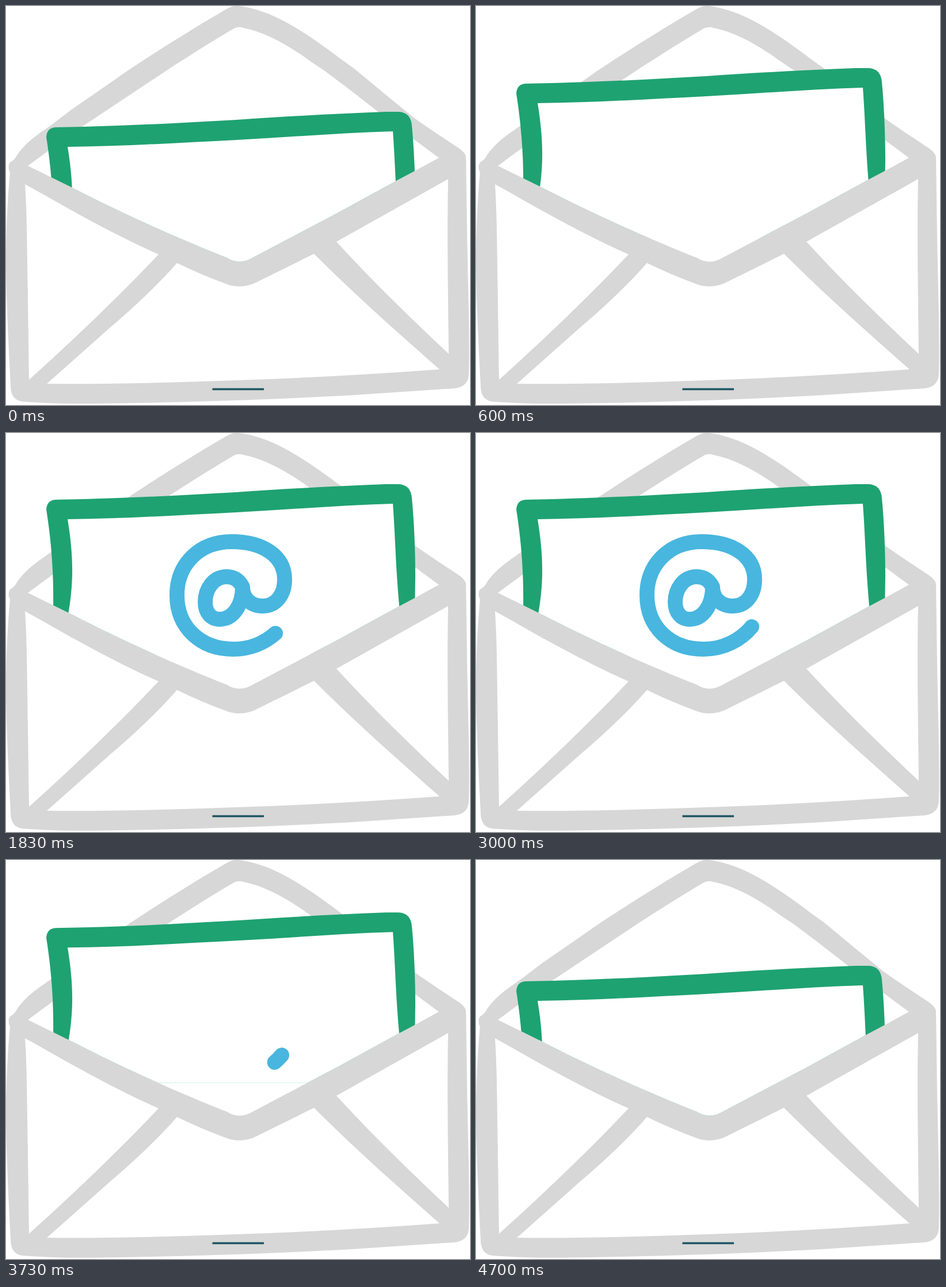
These frames come from a looping animation (806x694 px, 5010 ms). An HTML page:

```html
<!DOCTYPE html>
<html lang="en">
<head>
<meta charset="utf-8">
<title>Opening envelope</title>
<style>
  html, body { margin: 0; width: 100%; height: 100%; overflow: hidden; background: #fff; }
  svg { display: block; width: 806px; height: 694px; }
</style>
</head>
<body>
<svg viewBox="0 0 806 694">
  <clipPath id="opening">
    <path d="M0 0H806V264H752L710 287L678 304L574 361L430 437Q406 452 384 438C300 405 200 360 113 315L38 278H0Z"/>
  </clipPath>

  <!-- Envelope silhouette with its four openings cut out -->
  <path fill="#d7d7d7" fill-rule="evenodd" d="
    M404 0C396 -1 388 2 380 7C320 42 262 79 212 112L182 133L114 180L76 209C54 224 34 238 20 258
    Q15 268 7 272Q2 279 7 290C2 340 0 400 0 450C1 530 5 600 8 660Q8 685 28 688
    C90 693 150 692 200 691C330 689 470 684 600 677L780 665Q803 662 804 640
    C806 590 803 500 801 400L799 262Q797 253 780 243C756 227 730 210 708 194L658 153L605 109L580 91
    C530 53 480 20 440 8Q418 1 404 0Z
    M38 278L80 247L135 208L252 130L285 108C324 83 360 60 396 39Q404 35 412 38
    C448 45 488 66 527 95L551 111C584 135 616 160 645 183L710 233L752 264L710 287L678 304L574 361L430 437
    Q406 452 384 438C300 405 200 360 113 315Z
    M33 310L60 325C125 362 195 401 265 432C195 506 120 578 40 650C39 580 38 510 37 450Q36 350 33 310Z
    M297 447C262 487 220 526 180 560Q125 609 71 657C180 658 290 655 400 651Q580 645 753 632
    C676 564 606 502 535 431L430 483Q406 492 384 484Q340 468 297 447Z
    M574 410L768 301C766 400 768 510 769 605C704 544 638 480 574 410Z"/>

  <g clip-path="url(#opening)">
    <g id="letter">
      <path fill="#1ea271" d="M70 228Q71 212 86 211L135 210C220 208 310 203 400 198C490 192 575 187 660 184
        L682 184Q703 185 705 208C709 250 711 300 711 345L709 480H82V400C83 340 79 285 70 228Z"/>
      <path fill="#fff" d="M107 245C205 244 300 238 400 233C490 228 580 221 672 218C676 270 677 330 683 395V480H108V410
        C119 350 116 300 107 245Z"/>
      <path id="sign" pathLength="1" transform="translate(0 95)" fill="none" stroke="#48b6df"
        stroke-width="26" stroke-linecap="round" stroke-linejoin="round" d="M411 268
        C404 254 394 250 383 250C360 250 346 272 346 294C346 312 356 324 371 324C394 324 411 300 411 268
        C411 288 426 301 446 301C470 301 484 280 484 255C484 213 445 189 392 189
        C336 189 297 228 297 282C297 338 338 376 395 376C430 376 460 360 479 337"/>
    </g>
  </g>

  <path stroke="#1f5663" stroke-width="3.4" d="M358.5 666.5H448"/>
</svg>
<script>
  const LOOP = 5010;
  const LIFT = 95;
  const letter = document.getElementById('letter');
  const sign = document.getElementById('sign');

  // Symmetric ease: cubic Bezier with handles (pull, 0) and (1 - pull, 1)
  function ease(time, start, duration, pull) {
    const x = Math.min(1, Math.max(0, (time - start) / duration));
    if (x === 0 || x === 1) return x;
    let low = 0, high = 1;
    for (let i = 0; i < 24; i++) {
      const s = (low + high) / 2, r = 1 - s;
      const bx = 3 * pull * s * r * r + 3 * (1 - pull) * s * s * r + s ** 3;
      if (bx < x) low = s; else high = s;
    }
    return low * low * (3 - 2 * low);
  }

  // Twenty poses a second, held alternately for 30 and 70 ms
  function poseTime(ms) {
    const part = ms % 100;
    return ms - part + (part >= 30 ? 50 : 0);
  }

  function draw(now) {
    const time = poseTime(now % LOOP);
    const raised = ease(time, 37, 940, 0.77) - ease(time, 3565, 1000, 0.77);
    const head = ease(time, 780, 1230, 0.6);
    const tail = ease(time, 2960, 915, 0.6);

    letter.setAttribute('transform', `translate(0 ${-LIFT * raised})`);
    sign.setAttribute('visibility', head - tail > 0.001 ? 'visible' : 'hidden');
    sign.setAttribute('stroke-dasharray', `${head - tail} 3`);
    sign.setAttribute('stroke-dashoffset', -tail);
  }

  const begin = performance.now();
  function tick() {
    draw(performance.now() - begin);
    requestAnimationFrame(tick);
  }
  tick();
</script>
</body>
</html>
```
